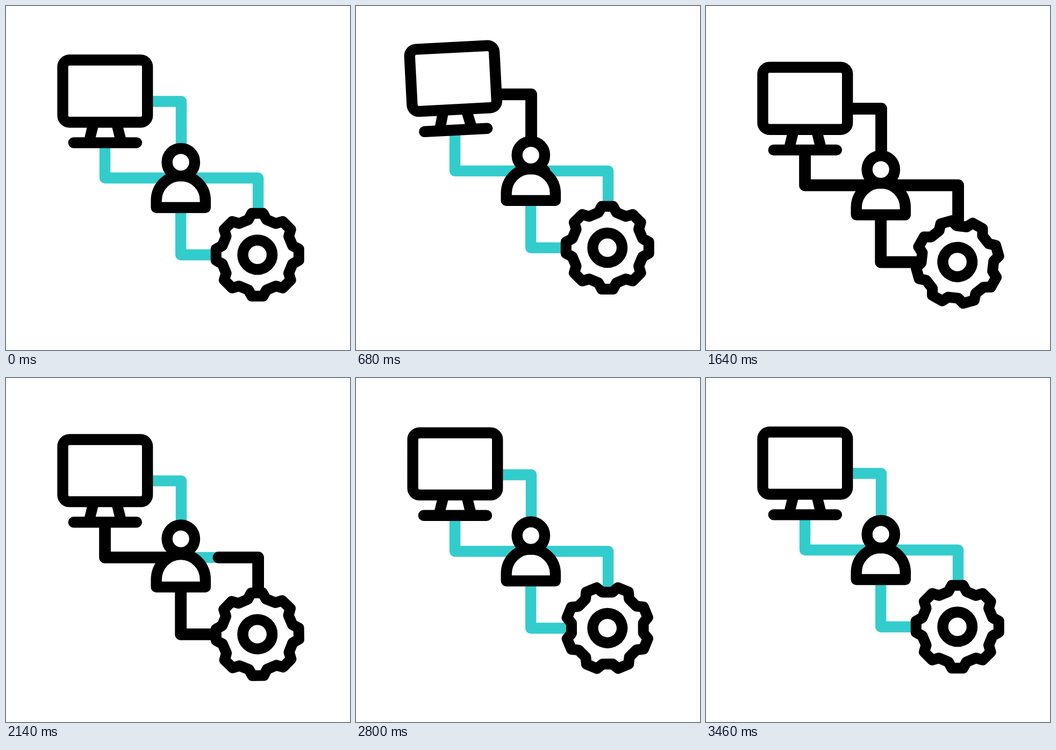
An HTML page with a canvas that plays this animation: 640 by 640 pixels, repeating every 3600 ms.

```html
<!DOCTYPE html>
<html lang="en">
<head>
<meta charset="utf-8">
<title>Connected system</title>
<style>
  html, body { margin: 0; width: 100%; height: 100%; overflow: hidden; background: #fff; }
  canvas { display: block; width: 100vmin; height: 100vmin; }
</style>
</head>
<body>
<canvas id="stage" width="640" height="640"></canvas>
<script>
const ctx = document.getElementById('stage').getContext('2d');
const LOOP = 3600, STEP = 20;
const TEAL = '#33cccc', BLACK = '#000', WHITE = '#fff';
const WEIGHT = 20.4;

const monitor = { x: 184.4, y: 158.4, w: 157.6, h: 115.7, baseY: 254.4, pivotY: 228 };
const person = { x: 325.3, headY: 290.7, shoulderY: 361.5, footY: 375, r: 45.6 };
const gear = { x: 467.8, y: 462.8, teeth: 8 };

const clamp = v => Math.min(1, Math.max(0, v));
const smooth = v => v * v * (3 - 2 * v);
const radians = deg => deg * Math.PI / 180;

// Cubic easing with flat ends and horizontal handles at x1 and x2.
function ease(x, x1 = 1 / 3, x2 = 2 / 3) {
  let lo = 0, hi = 1;
  for (let i = 0; i < 24; i++) {
    const u = (lo + hi) / 2, w = 1 - u;
    if (3 * w * w * u * x1 + 3 * w * u * u * x2 + u * u * u < x) lo = u;
    else hi = u;
  }
  return smooth(lo);
}

const progress = (t, from, to, x1, x2) => ease(clamp((t - from) / (to - from)), x1, x2);

// A smooth bump from 0 to 1 and back.
const hump = (t, centre, half) => smooth(clamp(1 - Math.abs(t - centre) / half));

const floatY = t => 17.4 * (2 * progress(t, 1003, 1808)
  - progress(t, 0, 1003) - progress(t, 1808, 3400, 0.28, 0.35));
const gearTurn = t => -360 * progress(t, 0, 3460, 0.305, 0.552);
const headLift = t => -8 * hump(t, 1170, 440) - 5.5 * hump(t, 2170, 430);

function monitorPose(t) {
  const start = t < LOOP / 2 ? 130 : 2757, p = (t - start) / 700;
  return {
    lift: -26.5 * hump(p, 0.5, 0.5),
    tilt: 3 * (hump(p, 0.3, 0.25) - hump(p, 0.77, 0.24))
  };
}

function paint(path, { fill, stroke, width = WEIGHT } = {}) {
  ctx.beginPath();
  path();
  if (fill) { ctx.fillStyle = fill; ctx.fill(); }
  if (stroke) { ctx.strokeStyle = stroke; ctx.lineWidth = width; ctx.stroke(); }
}

const polyline = pts => pts.forEach(([x, y]) => ctx.lineTo(x, y));
const circle = (x, y, r) => ctx.arc(x, y, r, 0, Math.PI * 2);

// A route leaves sideways, then turns up or down.
function elbow(x1, y1, x2, y2) {
  const across = Math.abs(x2 - x1), total = across + Math.abs(y2 - y1);
  const bend = across / total;
  const at = k => k < bend
    ? [x1 + (x2 - x1) * k / bend, y1]
    : [x2, y1 + (y2 - y1) * (k - bend) / (1 - bend)];
  return (a, b) => [a, ...(a < bend && bend < b ? [bend] : []), b].map(at);
}

const routes = [
  elbow(262, 177.5, 326, 268),
  elbow(325, 320, 469.1, 385),
  elbow(390, 463, 325.2, 378),
  elbow(325, 320, 184.1, 243)
];

function drawRoutes(t) {
  const head = i => clamp((t - 310) / 330 - i);
  const tail = i => clamp((t - 1803) / 252 - i);
  for (const part of routes) paint(() => polyline(part(0, 1)), { stroke: TEAL });
  routes.forEach((part, i) => {
    if (head(i) > tail(i)) {
      paint(() => polyline(part(tail(i), head(i))), { stroke: BLACK, width: 21.8 });
    }
  });
}

function drawMonitor(t) {
  const { x, y, w, h, baseY, pivotY } = monitor;
  const { lift, tilt } = monitorPose(t);
  const leg = side => [[x + side * 21.4, 218], [x + side * 28.8, 248]];
  ctx.save();
  ctx.translate(x, pivotY + lift);
  ctx.rotate(radians(tilt));
  ctx.translate(-x, -pivotY);
  paint(() => polyline([...leg(-1), ...leg(1).reverse()]), { fill: WHITE });
  ctx.lineCap = 'butt';
  for (const side of [-1, 1]) paint(() => polyline(leg(side)), { stroke: BLACK, width: 20 });
  ctx.lineCap = 'round';
  paint(() => polyline([[x - 58.5, baseY], [x + 58.5, baseY]]), { stroke: BLACK });
  paint(() => ctx.roundRect(x - w / 2, y - h / 2, w, h, 12.5), { fill: WHITE, stroke: BLACK });
  ctx.restore();
}

function drawPerson(t) {
  const { x, headY, shoulderY, footY, r } = person;
  const lift = headLift(t);
  paint(() => {
    ctx.moveTo(x - r, footY);
    ctx.ellipse(x, shoulderY, r, r - lift / 3, 0, Math.PI, Math.PI * 2);
    ctx.lineTo(x + r, footY);
    ctx.closePath();
  }, { fill: WHITE, stroke: BLACK });
  paint(() => circle(x, headY + lift, 25.7), { fill: WHITE, stroke: BLACK });
}

function drawGear(t) {
  const corner = (r, deg) => ctx.lineTo(r * Math.sin(radians(deg)), -r * Math.cos(radians(deg)));
  ctx.save();
  ctx.translate(gear.x, gear.y);
  ctx.rotate(radians(gearTurn(t)));
  paint(() => {
    for (let i = 0; i < gear.teeth; i++) {
      const mid = i * 360 / gear.teeth;
      corner(67.5, mid - 14.5);
      corner(77.7, mid - 7.8);
      corner(77.7, mid + 7.8);
      corner(67.5, mid + 14.5);
    }
    ctx.closePath();
  }, { fill: WHITE, stroke: BLACK, width: 20 });
  paint(() => circle(0, 0, 27.3), { stroke: BLACK });
  ctx.restore();
}

function draw(t) {
  ctx.fillStyle = WHITE;
  ctx.fillRect(0, 0, 640, 640);
  ctx.lineCap = ctx.lineJoin = 'round';
  ctx.save();
  ctx.translate(0, floatY(t));
  drawRoutes(t);
  drawMonitor(t);
  drawPerson(t);
  drawGear(t);
  ctx.restore();
}

const begin = performance.now();
function tick() {
  const t = (performance.now() - begin) % LOOP;
  draw(Math.floor(t / STEP) * STEP);
  requestAnimationFrame(tick);
}
tick();
</script>
</body>
</html>
```
